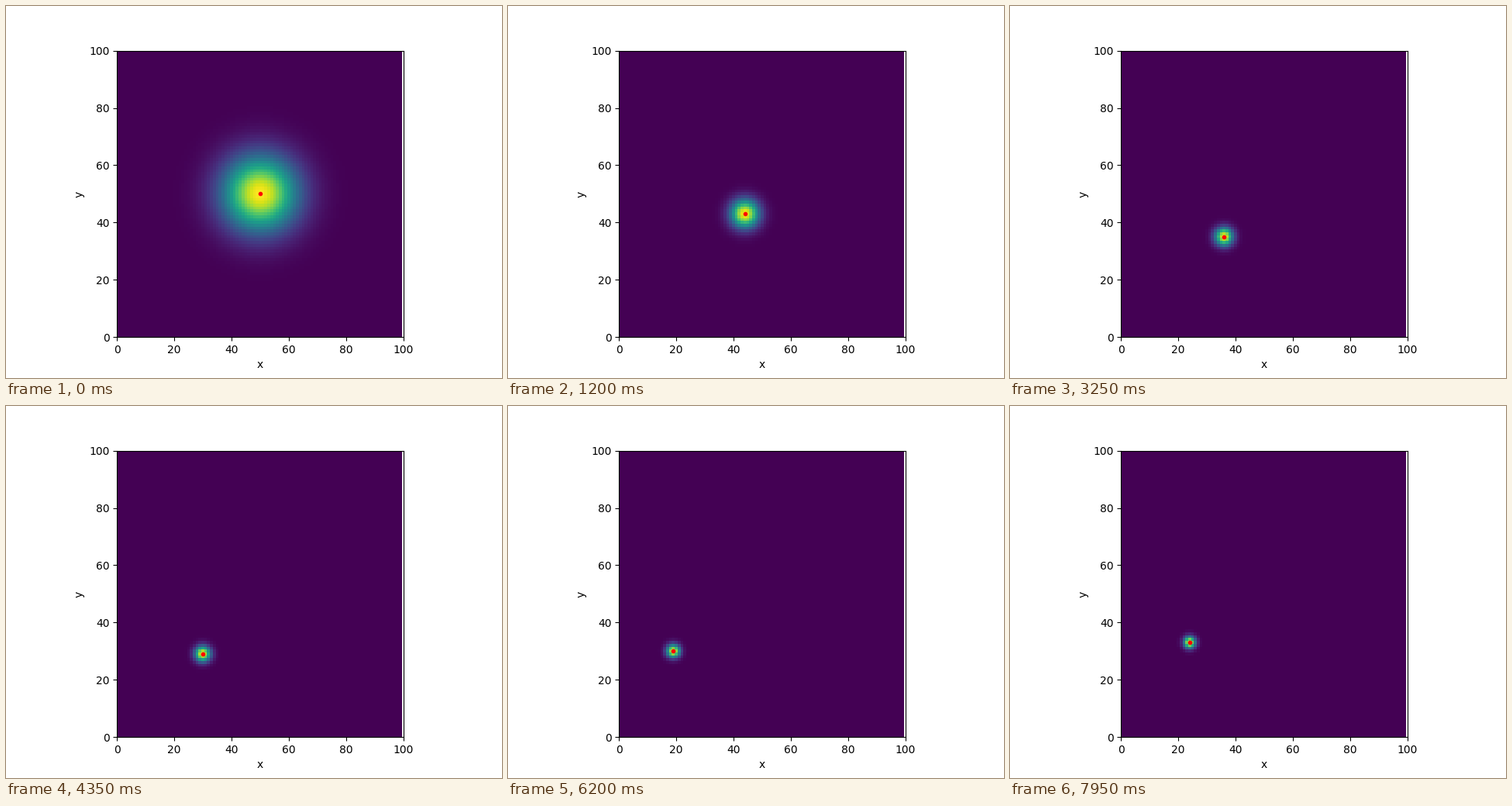
A matplotlib script that plays this animation: 640 by 480 pixels, repeating every 8 s.

```python
import numpy as np
import matplotlib.pyplot as plt
from matplotlib.animation import FuncAnimation

SIZE = 100
FRAMES = 160
INTERVAL = 50

# Key points of the random walk: step, x, y
STOPS = [(0, 50, 50), (24, 44, 43), (48, 41, 37), (65, 36, 35),
         (87, 30, 29), (124, 19, 30), (136, 24, 30), (159, 24, 33)]

rng = np.random.default_rng(4)


def steps(count, shift):
    """Unit steps in random order that add up to the given shift."""
    pairs = (count - abs(shift)) // 4
    moves = [int(np.sign(shift))] * abs(shift) + [1, -1] * pairs
    moves += [0] * (count - len(moves))
    return rng.permutation(moves)


def walk(axis):
    path = [STOPS[0][axis]]
    for a, b in zip(STOPS, STOPS[1:]):
        path.extend(a[axis] + np.cumsum(steps(b[0] - a[0], b[axis] - a[axis])))
    return path


xs, ys = walk(1), walk(2)
grid = np.arange(SIZE)


def belief(i):
    """Gaussian around the walker; its precision grows with every step."""
    precision = 0.003 * (i + 4)
    gx = np.exp(-0.5 * precision * (grid - xs[i]) ** 2)
    gy = np.exp(-0.5 * precision * (grid - ys[i]) ** 2)
    return np.outer(gy, gx)


fig, ax = plt.subplots(figsize=(6.4, 4.8), dpi=100)
image = ax.imshow(belief(0), origin="lower", cmap="viridis", vmin=0, vmax=1)
dot, = ax.plot([xs[0]], [ys[0]], "r.")
ax.set(xlim=(0, SIZE), ylim=(0, SIZE), xlabel="x", ylabel="y")


def update(i):
    image.set_data(belief(i))
    dot.set_data([xs[i]], [ys[i]])
    return image, dot


anim = FuncAnimation(fig, update, frames=FRAMES, interval=INTERVAL,
                     repeat=True, repeat_delay=0)
plt.show()
```
